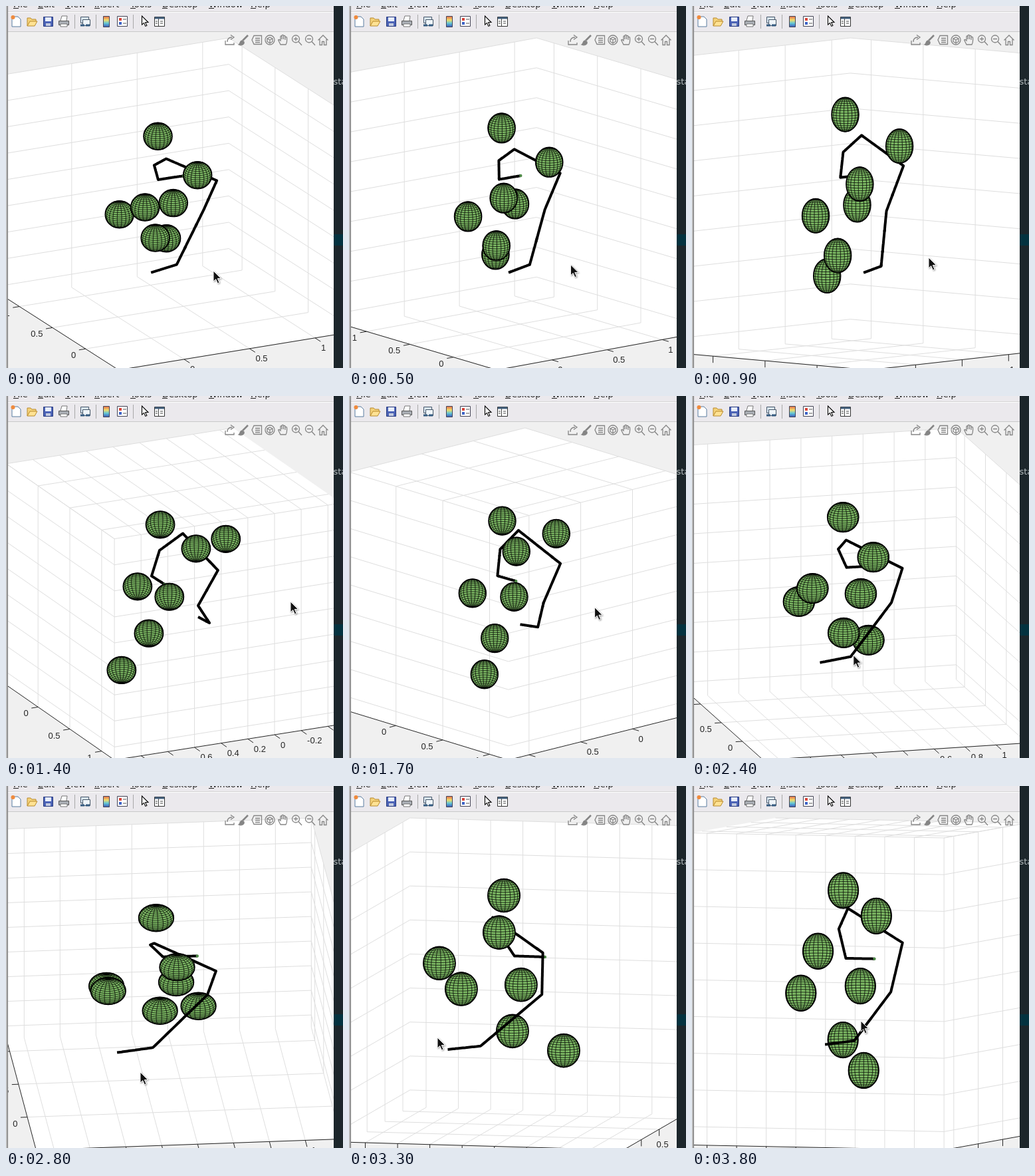
Write an HTML page that moves like this. It is 507 by 544 pixels and loops after 3900 ms.

```html
<!DOCTYPE html>
<html lang="en">
<head>
<meta charset="utf-8">
<title>Rotating 3D plot</title>
<style>
html, body { margin: 0; width: 100%; height: 100%; overflow: hidden; background: #f0f0f0; }
svg { display: block; }
text { font-family: "Liberation Sans", Arial, sans-serif; }
.menu text { font: 13px "DejaVu Sans", sans-serif; fill: #222; }
.tick { font-size: 13px; fill: #262626; }
.grid { stroke: #dedede; fill: none; }
.axis { stroke: #262626; fill: none; }
.limb { stroke: #000; stroke-width: 4; fill: none; stroke-linejoin: round; }
.ball { fill: #7dba64; stroke: #000; stroke-width: 1.7; }
.mesh { fill: none; stroke: #000; stroke-width: .75; }
.tools { fill: none; stroke: #858585; stroke-width: 1.3; }
</style>
</head>
<body>
<svg width="507" height="544" viewBox="0 0 507 544">
  <defs>
    <clipPath id="pane"><rect x="3" y="39" width="490" height="505"/></clipPath>
    <path id="arrow" d="M0 0V16L3.7 12.6 6.4 18.8 9 17.7 6.3 11.6H11.6Z"/>
    <linearGradient id="bar" x1="0" y1="0" x2="0" y2="1">
      <stop offset="0" stop-color="#e56a4b"/><stop offset=".35" stop-color="#f2dc68"/>
      <stop offset=".65" stop-color="#62c8d8"/><stop offset="1" stop-color="#3b55b8"/>
    </linearGradient>
  </defs>
  <rect width="507" height="544" fill="#f0f0f0"/>
  <rect width="507" height="38" fill="#ebe9ed"/>

  <g class="menu" id="menu"></g>
  <path d="M3 8.5H493" stroke="#d4d4d4"/>
  <path d="M3 9.5H493" stroke="#fff"/>
  <path d="M3 38.5H493" stroke="#c9c9c9"/>
  <path d="M103.5 13V34M135.5 13V34M191.5 13V34" stroke="#a8a8a8"/>

  <g stroke-width="1">
    <path d="M9 16H18L22 20V31H9Z" fill="#fff" stroke="#5b7da0"/>
    <circle cx="10.500" cy="17" r="3" fill="#f08a3c"/>
    <path d="M32 30V18H37L39 20H45V23" fill="#f4d27a" stroke="#b98a2c"/>
    <path d="M32 30L36 23H47L43 30Z" fill="#ffe294" stroke="#b98a2c"/>
    <path d="M56.500 16.500H70.500V30.500H56.500Z" fill="#4c63b6" stroke="#263a80"/>
    <path d="M59 17H68V23H59Z" fill="#e8eefc"/><path d="M60 26H67V30H60Z" fill="#c3cbe0"/>
    <path d="M82 22L84 15H92L91 22" fill="#fff" stroke="#777"/>
    <path d="M79.500 22.500H94.500V28.500H79.500Z" fill="#a9adb4" stroke="#555"/>
    <path d="M82 27H92V31H82Z" fill="#fff" stroke="#777"/>
    <path d="M112.500 16.500H124.500V25.500H112.500Z" fill="#dbe8f4" stroke="#456"/>
    <path d="M115.500 20.500H126.500V29.500H115.500Z" fill="#eef4fa" stroke="#456"/>
    <path d="M112 29H118M120 29H126" stroke="#345a80" stroke-width="3"/>
    <path d="M146.500 15.500H155.500V31.500H146.500Z" fill="url(#bar)" stroke="#445"/>
    <path d="M167.500 15.500H182.500V30.500H167.500Z" fill="#fff" stroke="#445"/>
    <path d="M170 18H174V22H170Z" fill="#d9443a"/><path d="M170 24H174V28H170Z" fill="#3d64c8"/>
    <path d="M176 20H181M176 26H181" stroke="#555"/>
    <use href="#arrow" transform="translate(204.500 15) scale(.82)" fill="#fff" stroke="#000" stroke-width="1.300"/>
    <path d="M223.500 16.500H238.500V30.500H223.500Z" fill="#fff" stroke="#333"/>
    <path d="M224 18H238" stroke="#44617e" stroke-width="3"/>
    <path d="M229.500 19V30M225 23H228M225 26H228M232 23H236M232 26H236" stroke="#444"/>
  </g>

  <g id="scene" clip-path="url(#pane)"></g>

  <g class="tools">
    <path d="M330 52V58H343V55M333 54C333 49 336 47 340 47M338 43.500L343 47 338 50.500"/>
    <path d="M364 44L356 52" stroke-width="2.600"/><path d="M355 52C351 53 353 57 350 58 354 60 359 58 358 54Z" fill="#858585"/>
    <path d="M373 44.500H384.500V57.500H373L370 51ZM375 48.500H382M375 51.500H382M375 54.500H382"/>
    <circle cx="397" cy="51" r="7"/><path d="M397 47L401 49V53.500L397 56 393 53.500V49ZM393 49L397 51 401 49M397 51V56"/>
    <path d="M413 58L410 52C409 50 411 50 413 52V46C413 44.500 415 44.500 415 46V50 44.500C415 43 417.500 43 417.500 44.500V50 45.500C417.500 44 420 44 420 45.500V51 47.500C420 46 422.500 46 422.500 47.500 423 53 423 55 421 58Z"/>
    <circle cx="436" cy="49.500" r="5.500"/><path d="M440 53.500L445 59M433 49.500H439M436 46.500V52.500"/>
    <circle cx="456" cy="49.500" r="5.500"/><path d="M460 53.500L465 59M453 49.500H459"/>
    <path d="M469.500 51.500L477 44 484.500 51.500M472 50V58.500H475.500V53.500H478.500V58.500H482V50"/>
  </g>

  <use id="cursor" href="#arrow" fill="#111" stroke="#fff" stroke-width="1" style="filter:drop-shadow(1px 1px 1px #0006)"/>

  <rect width="2" height="544" fill="#b5b5b5"/>
  <path d="M2.500 0V544" stroke="#777"/>
  <rect x="493" width="14" height="544" fill="#1c262b"/>
  <rect x="493" y="343" width="14" height="17" fill="#04323f"/>
  <text x="492.500" y="118" fill="#b9c0c2" style="font:13px 'DejaVu Sans',sans-serif">sta</text>
</svg>

<script>
const LOOP = 3900, STEP = 100;
const LO = -0.5, HI = 1.2, MID = 0.35, HALF = 0.85, R = 0.097;
const byId = id => document.getElementById(id);
const rad = d => d * Math.PI / 180;
const fmt = p => p[0].toFixed(1) + ' ' + p[1].toFixed(1);

// time, azimuth, elevation, cursor x, cursor y
const keys = [
  [0, -26.8, 19.8, 312, 398],
  [900, -48.2, 4.5, 356, 378],
  [1400, -64.5, -20.6, 428, 309],
  [2000, -25.8, -5.3, 289, 336],
  [2800, -5.6, 28.2, 202, 430],
  [3300, 12.5, 7.1, 133, 378],
  [3800, -18.3, -2.9, 254, 353]
];

// positions relative to the middle of the axes box
const balls = [
  [-.092, .057, .511], [-.020, -.400, .351], [-.400, -.358, .155], [-.365, .097, -.051],
  [.018, .041, -.009], [-.061, .157, -.298], [.185, .479, -.445]
];
const limb = [
  [.145, .138, .146], [-.046, .144, .146], [-.126, .046, .300], [-.121, -.126, .404],
  [.213, -.230, .217], [.178, -.098, -.045], [-.149, -.339, -.328], [-.350, -.350, -.352]
];

// monotone cubic through the keys
function sample(t, col) {
  const last = keys.length - 1;
  let i = 0;
  while (i < last - 1 && t >= keys[i + 1][0]) i++;
  const slope = k => (keys[k + 1][col] - keys[k][col]) / (keys[k + 1][0] - keys[k][0]);
  const tangent = k => {
    if (k === 0) return slope(0);
    if (k === last) return slope(last - 1);
    const a = slope(k - 1), b = slope(k);
    return a * b > 0 ? 2 * a * b / (a + b) : 0;
  };
  const [a, b] = [keys[i], keys[i + 1]], h = b[0] - a[0], u = (t - a[0]) / h;
  const u2 = u * u, u3 = u2 * u;
  return a[col] * (2 * u3 - 3 * u2 + 1) + b[col] * (3 * u2 - 2 * u3)
    + h * (tangent(i) * (u3 - 2 * u2 + u) + tangent(i + 1) * (u3 - u2));
}

// orthographic view whose box is stretched to fill the axes area
function makeView(azDeg, elDeg) {
  const c = Math.cos(rad(azDeg)), s = Math.sin(rad(azDeg));
  const ce = Math.cos(rad(elDeg)), se = Math.sin(rad(elDeg));
  const span = Math.abs(c) + Math.abs(s);
  const kx = 296.5 / span, ky = 293.5 / (ce + Math.abs(se) * span);
  return {
    kx, ky, c, s, elDeg,
    at: ([x, y, z]) => [252.3 + kx * (c * x + s * y), 297.5 - ky * (ce * z + se * (c * y - s * x))],
    depth: ([x, y, z]) => ce * (s * x - c * y) + se * z
  };
}

function ticks(step) {
  const out = [];
  for (let i = Math.ceil(LO / step - 1e-6); i * step <= HI + 1e-6; i++) out.push(+(i * step).toFixed(1));
  return out;
}

function drawBox(v) {
  const far = [v.s < 0 ? HALF : -HALF, HALF, v.elDeg >= 0 ? -HALF : HALF];
  const stepFor = k => ticks(Math.abs(k) * v.kx > 198.5 ? .2 : .5);
  const marks = [stepFor(v.c), stepFor(v.s), ticks(.2)];
  const point = (a, va, b, vb, c, vc) => {
    const p = [];
    p[a] = va; p[b] = vb; p[c] = vc;
    return v.at(p);
  };
  let walls = '', grid = '', axis = '', text = '';
  for (let a = 0; a < 3; a++) {
    const b = (a + 1) % 3, c = (a + 2) % 3;
    const corner = (p, q) => fmt(point(a, far[a], b, p, c, q));
    walls += `M${corner(-HALF, -HALF)}L${corner(HALF, -HALF)}L${corner(HALF, HALF)}L${corner(-HALF, HALF)}Z`;
    for (const m of marks[b]) grid += `M${corner(m - MID, -HALF)}L${corner(m - MID, HALF)}`;
    for (const m of marks[c]) grid += `M${corner(-HALF, m - MID)}L${corner(HALF, m - MID)}`;
  }

  const side = v.elDeg >= 0 ? -1 : 1;
  const upright = Math.abs(v.elDeg) < 10;
  for (let a = 0; a < 2; a++) {
    const o = 1 - a, edge = side * far[o];
    const on = (val, off = edge) => point(a, val, o, off, 2, -HALF);
    axis += `M${fmt(on(-HALF))}L${fmt(on(HALF))}`;
    for (const m of marks[a]) {
      const p = on(m - MID), q = on(m - MID, edge + Math.sign(edge) * .1);
      let dx = q[0] - p[0], dy = q[1] - p[1];
      if (upright) { dx = 0; dy = 1; }
      const k = 10 / Math.hypot(dx, dy);
      axis += `M${fmt(p)}l${fmt([dx * k, dy * k])}`;
      const left = dx < 0;
      const [lx, ly, anchor] = upright ? [5, 27, 'middle'] : left ? [-14.5, 14, 'end'] : [9, 19.5, 'start'];
      text += `<text class="tick" x="${p[0] + lx}" y="${p[1] + ly}" text-anchor="${anchor}">${m}</text>`;
    }
  }
  return `<path d="${walls}" fill="#fff"/><path class="grid" d="${grid}"/><path class="axis" d="${axis}"/>` + text;
}

const unit = (lat, lon) => [
  Math.cos(lat) * Math.cos(lon), Math.cos(lat) * Math.sin(lon), Math.sin(lat)
];

function drawBall(v, mid) {
  const N = 20;
  let d = '';
  const trace = (count, dir) => {
    let pen = false;
    for (let j = 0; j <= count; j++) {
      const n = dir(j), seen = v.depth(n) > -.02;
      if (seen) d += (pen ? 'L' : 'M') + fmt(v.at(mid.map((m, k) => m + R * n[k])));
      pen = seen;
    }
  };
  for (let i = 0; i < N; i++) {
    const lon = 2 * Math.PI * i / N, lat = Math.PI * (i / N - .5);
    trace(N, j => unit(Math.PI * (j / N - .5), lon));
    if (i) trace(2 * N, j => unit(lat, Math.PI * j / N));
  }
  const [x, y] = v.at(mid);
  return `<ellipse class="ball" cx="${x}" cy="${y}" rx="${R * v.kx}" ry="${R * v.ky}"/><path class="mesh" d="${d}"/>`;
}

function drawDot(v) {
  const [x, y] = v.at(limb[0]);
  return `<circle cx="${x}" cy="${y}" r="2.2" fill="#4f8a48"/>`;
}

// limb samples, cut into layers between the depth-sorted balls
const SUB = 24, path = [];
for (let i = 0; i < limb.length - 1; i++)
  for (let j = 0; j < SUB; j++)
    path.push(limb[i].map((a, k) => a + (limb[i + 1][k] - a) * j / SUB));
path.push(limb[limb.length - 1]);

function drawData(v) {
  const order = balls.map(b => ({ b, z: v.depth(b) })).sort((p, q) => p.z - q.z);
  const layer = p => order.filter(o => o.z < v.depth(p)).length;
  const layers = Array(order.length + 1).fill('');
  let prev = -1;
  for (let i = 0; i < path.length - 1; i++) {
    const k = layer(path[i]);
    // each run starts one piece early so that no seam shows
    if (k !== prev) layers[k] += `M${fmt(v.at(path[Math.max(0, i - 1)]))}L${fmt(v.at(path[i]))}`;
    layers[k] += 'L' + fmt(v.at(path[i + 1]));
    prev = k;
  }
  const tip = layer(limb[0]);
  return layers.map((d, k) =>
    (d ? `<path class="limb" d="${d}"/>` : '') +
    (k === tip ? drawDot(v) : '') +
    (k < order.length ? drawBall(v, order[k].b) : '')).join('');
}

const menu = { File: 11, Edit: 48, View: 89, Insert: 133, Tools: 187, Desktop: 235, Window: 305, Help: 368 };
byId('menu').innerHTML = Object.entries(menu).map(([word, x]) =>
  `<text x="${x}" y="1.5">${word}</text><path d="M${x} 3.500h8" stroke="#222"/>`).join('');

let shown = -1;
function render(t) {
  const v = makeView(sample(t, 1), sample(t, 2));
  byId('scene').innerHTML = drawBox(v) + drawData(v);
  byId('cursor').setAttribute('transform', `translate(${sample(t, 3)} ${sample(t, 4)})`);
}
function tick() {
  const t = Math.floor(performance.now() % LOOP / STEP) * STEP;
  if (t !== shown) render(shown = t);
  requestAnimationFrame(tick);
}
tick();
</script>
</body>
</html>
```
